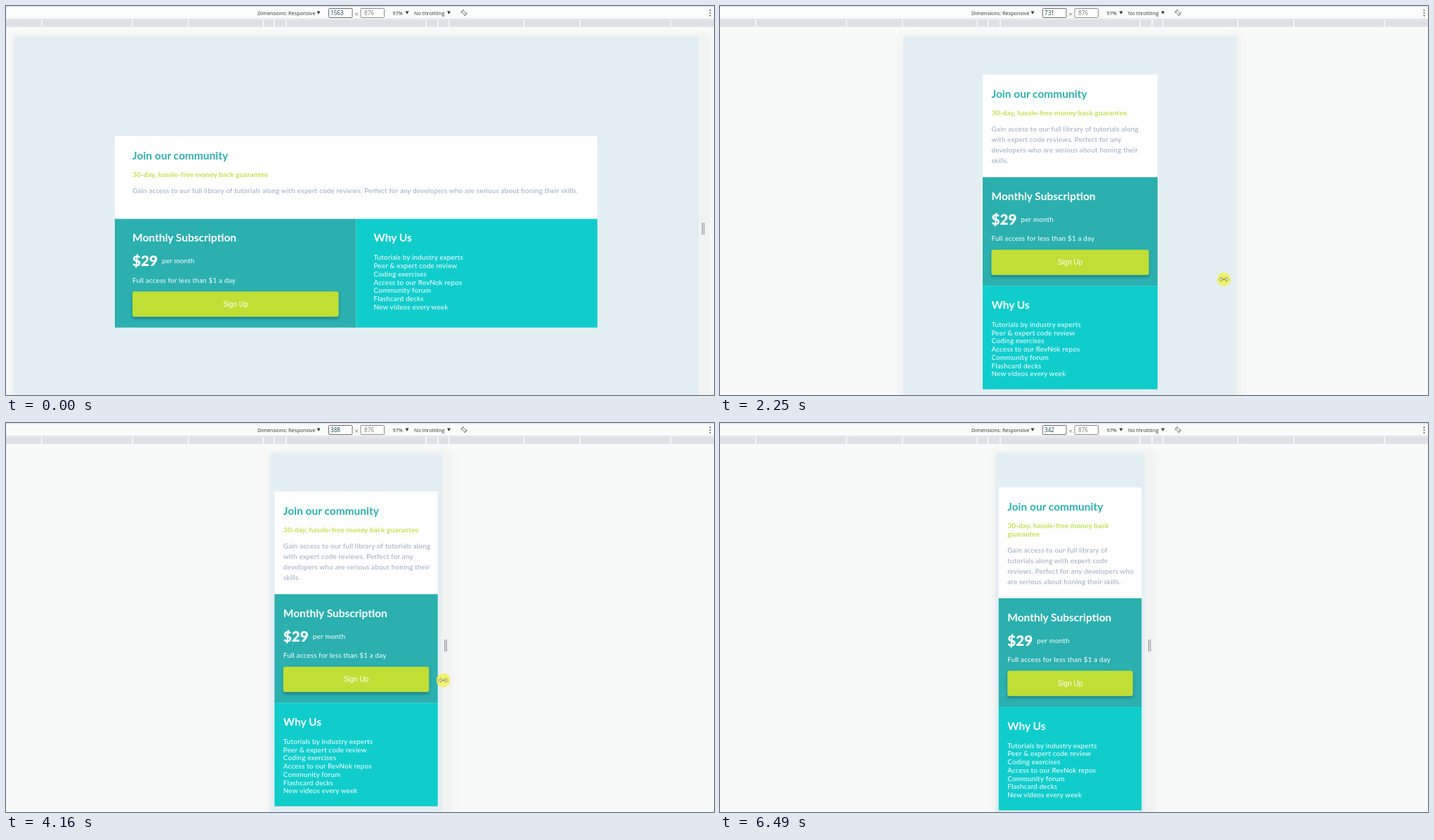
Write an HTML page that moves like this. It is 1008x555 px and loops after 7.69 s.

```html
<!DOCTYPE html>
<html lang="en">
<head>
<meta charset="utf-8">
<title>Responsive card</title>
<style>
html, body { margin: 0; width: 100%; height: 100%; overflow: hidden; background: #f8faf9; }
svg { display: block; width: 100vw; height: 100vh; }
text { white-space: pre; }
.bar { font: 7.3px "Open Sans", sans-serif; fill: #333; }
.num { font: 8.2px "Open Sans", sans-serif; }
.copy { font: 9.9px Lato, sans-serif; letter-spacing: .18px; fill: #fff; }
.head { font: bold 15.5px Lato, sans-serif; fill: #fff; }
.offer { font: bold 10.3px Lato, sans-serif; fill: #c4e052; }
.price { font: 900 20.6px Lato, sans-serif; fill: #fff; }
.label { font: 10px "Liberation Sans", Arial, sans-serif; fill: #fff; text-anchor: middle; }
</style>
</head>
<body>
<svg viewBox="0 0 1008 555" preserveAspectRatio="none">
  <defs>
    <filter id="pageShadow" x="-10%" y="-10%" width="120%" height="120%">
      <feDropShadow dx="0" dy="0" stdDeviation="6" flood-color="#55606a" flood-opacity=".12"/>
    </filter>
    <filter id="buttonShadow" x="-10%" y="-30%" width="120%" height="180%">
      <feDropShadow dx="0" dy="2.5" stdDeviation="2.2" flood-color="#124" flood-opacity=".38"/>
    </filter>
  </defs>
  <rect width="1008" height="555" fill="#f8faf9"/>

  <g id="device">
    <rect id="frame" fill="#f1f3f3" filter="url(#pageShadow)"/>
    <path id="grip" d="M-6.6 309V326M-4.2 309V326" stroke="#8b8f96" stroke-width="1.1"/>
    <rect id="page" fill="#e3eef3"/>
  </g>

  <g id="card">
    <rect id="introBox" fill="#fff"/>
    <rect id="planBox" fill="#2bb0af"/>
    <rect id="whyBox" fill="#10cdcc"/>
    <g id="intro">
      <text class="head" y="33" style="fill:#2bb1b0">Join our community</text>
      <text class="offer" id="offer"></text>
      <text class="copy" id="pitch" style="fill:#9aa8c0"></text>
    </g>
    <g id="plan">
      <text class="head" y="32.7">Monthly Subscription</text>
      <text class="price" y="67.6">$29</text>
      <text class="copy" x="42" y="63.6">per month</text>
      <text class="copy" y="91">Full access for less than $1 a day</text>
      <rect id="button" y="103.4" height="36" rx="3" fill="#bfdf34" filter="url(#buttonShadow)"/>
      <text class="label" id="buttonLabel" y="125">Sign Up</text>
    </g>
    <g id="why">
      <text class="head" y="32.7">Why Us</text>
      <text class="copy" id="perks"></text>
    </g>
  </g>

  <g id="toolbar">
    <rect width="1008" height="30" fill="#fafbfb"/>
    <rect width="1008" height="1.5" fill="#e1e2e4"/>
    <rect y="18" width="1008" height="1" fill="#dddfe2"/>
    <rect y="19.5" width="1008" height="10.3" fill="#dee0e5"/>
    <path id="ticks" stroke="#fff" stroke-width="1.4"/>
    <text class="bar" x="358" y="12.8">Dimensions: Responsive</text>
    <text class="bar" x="550.5" y="12.8">97%</text>
    <text class="bar" x="581" y="12.8">No throttling</text>
    <path d="M442.5 7.5h5l-2.5 4.2zM568.5 7.5h5l-2.5 4.2zM628 7.5h5l-2.5 4.2z" fill="#333"/>
    <rect x="459.5" y="3.5" width="33.5" height="13" rx="1" fill="#fff" stroke="#6c6c6c"/>
    <rect x="505" y="3.5" width="33.5" height="13" rx="1" fill="#fff" stroke="#8a8a8a"/>
    <text class="num" id="widthField" x="462" y="13" fill="#14484c"></text>
    <text class="num" x="510" y="13" fill="#777">876</text>
    <path d="M497 9.5l4 4m0-4l-4 4" stroke="#666" stroke-width=".8"/>
    <g fill="none" stroke="#666" stroke-width=".8">
      <rect x="650.3" y="6.6" width="3.4" height="6" rx=".6" transform="rotate(-45 652 9.6)"/>
      <path d="M648.1 10.4A4 4 0 0 1 652 5.6M655.9 8.8A4 4 0 0 1 652 13.6"/>
    </g>
    <g fill="#555"><circle cx="1002.5" cy="6.3" r="1"/><circle cx="1002.5" cy="10" r="1"/><circle cx="1002.5" cy="13.7" r="1"/></g>
  </g>

  <g id="cursor">
    <circle r="10" fill="#f0f04e" opacity=".8"/>
    <path id="resize" d="M-7.2 0L-3.2 -3V-.7H3.2V-3L7.2 0L3.2 3V.7H-3.2V3Z" fill="#f8f8b8" stroke="#75754a" stroke-width=".7"/>
    <path id="pointer" d="M0 0V9.5L2.3 7.4L3.8 10.8L5.3 10.1L3.8 6.9H6.8Z" fill="#fff" stroke="#222" stroke-width=".7"/>
  </g>
</svg>
<script>
const LOOP = 7690, CENTER = 498.5, MIDDLE = 322.25;
const FULL = 1563, HALF_SCALE = .312;
const LAG = 45, LEAD = 90; // page follows the grip, the grip follows the cursor
const ENTER = 70, GRAB = 650, RELEASE = 5740, EXIT = 6490;
const LINE = 14.85, TIGHT = 11.75;

const $ = id => document.getElementById(id);
const set = (id, attrs) => {
  for (const name in attrs) $(id).setAttribute(name, attrs[name]);
};
const box = (id, x, y, width, height) => set(id, { x, y, width, height });
const move = (id, x, y) => set(id, { transform: `translate(${x} ${y})` });
const mix = (a, b, u) => a + (b - a) * u;
const progress = (from, to, t) => Math.min(1, Math.max(0, (t - from) / (to - from)));
const ease = u => (1 - Math.cos(Math.PI * u)) / 2;

// Turning points of the drag: time, viewport width
const drag = [
  [740, FULL], [1120, 1392], [1530, 1255], [1720, 1043], [1790, 1043],
  [2310, 691], [2860, 602], [3560, 425], [4690, 355], [5150, 342]
];
const widthAt = t => drag.reduce((width, [time, next], i) =>
  i ? mix(width, next, progress(drag[i - 1][0], time, t)) : next, FULL);
const inset = width => (FULL - width) * HALF_SCALE;
const rightAt = t => 998 - inset(widthAt(t));

function cursorAt(t) {
  const grabbed = [rightAt(t + LEAD) - 7, mix(386, 363, ease(progress(2860, 3560, t)))];
  if (t < RELEASE) {
    const u = ease(progress(ENTER, GRAB, t));
    return [mix(976, grabbed[0], u), mix(533, grabbed[1] + 4, u)];
  }
  const u = ease(progress(RELEASE, EXIT, t)), v = 1 - u;
  return [mix(grabbed[0], 898, u), v * v * grabbed[1] + 2 * u * v * 260 + u * u * 546];
}

const offer = "30-day, hassle-free money back guarantee";
const pitch = "Gain access to our full library of tutorials along with expert code reviews. " +
  "Perfect for any developers who are serious about honing their skills.";
const perks = ["Tutorials by industry experts", "Peer & expert code review", "Coding exercises",
  "Access to our RevNok repos", "Community forum", "Flashcard decks", "New videos every week"];

const ruler = document.createElement("canvas").getContext("2d");
function measure(id, text) {
  const style = getComputedStyle($(id)), size = parseFloat(style.fontSize);
  ruler.font = `${style.fontWeight} 100px ${style.fontFamily}`;
  return ruler.measureText(text).width * size / 100 +
    (parseFloat(style.letterSpacing) || 0) * text.length;
}

function wrap(id, text, limit) {
  const lines = [];
  for (const word of text.split(" ")) {
    const last = lines.length - 1, longer = `${lines[last]} ${word}`;
    if (last >= 0 && measure(id, longer) <= limit) lines[last] = longer;
    else lines.push(word);
  }
  return lines;
}

function setLines(id, lines, y, step) {
  $(id).replaceChildren(...lines.map((line, i) => {
    const span = document.createElementNS("http://www.w3.org/2000/svg", "tspan");
    span.setAttribute("x", 0);
    span.setAttribute("y", y + i * step);
    span.textContent = line;
    return span;
  }));
}

function layoutCard(pageWidth, wide) {
  const cardWidth = wide ? Math.min(687, pageWidth * .779) : Math.min(249, pageWidth * .955);
  const pad = wide ? 25 : 12.5, limit = cardWidth - 2 * pad + 3.6;
  const left = CENTER - cardWidth / 2;

  const offerLines = wrap("offer", offer, limit), pitchLines = wrap("pitch", pitch, limit);
  const shift = (offerLines.length - 1) * TIGHT;
  setLines("offer", offerLines, 58, TIGHT);
  setLines("pitch", pitchLines, 81.5 + shift, LINE);

  const introHeight = wide ? 118 : 102 + shift + (pitchLines.length - 1) * LINE;
  const planHeight = 155, whyHeight = wide ? planHeight : 147.6;
  const total = introHeight + planHeight + (wide ? 0 : whyHeight);
  const top = MIDDLE - total / 2, planTop = top + introHeight;
  const column = wide ? cardWidth / 2 : cardWidth;
  const whyLeft = wide ? left + column : left;
  const whyTop = wide ? planTop : planTop + planHeight;
  const buttonWidth = column - 2 * pad;

  box("introBox", left, top, cardWidth, introHeight);
  box("planBox", left, planTop, column, planHeight);
  box("whyBox", whyLeft, whyTop, column, whyHeight);
  move("intro", left + pad, top);
  move("plan", left + pad, planTop);
  move("why", whyLeft + pad, whyTop);
  set("button", { width: buttonWidth });
  set("buttonLabel", { x: buttonWidth / 2 });
}

function draw(t) {
  const width = widthAt(t), delayed = widthAt(t - LAG);
  const left = 11 + inset(delayed), right = rightAt(t);
  const pageWidth = 2 * (CENTER - left);
  box("page", left, 43, pageWidth, 520);
  box("frame", left, 43, right - left, 540);
  move("grip", right, 0);
  layoutCard(pageWidth, delayed > 768);
  $("widthField").textContent = Math.round(width);

  const holding = t >= GRAB && t < RELEASE;
  move("cursor", ...cursorAt(t));
  set("cursor", { visibility: t >= ENTER && t < EXIT ? "visible" : "hidden" });
  set("resize", { display: holding ? "inline" : "none" });
  set("pointer", { display: holding ? "none" : "inline" });
}

const presets = [320, 375, 425, 768, 1024, 1440];
set("ticks", {
  d: presets.flatMap(size => [-size, size])
    .map(size => `M${CENTER + size * .311} 19.5V29.8`).join("")
});
setLines("perks", perks, 58.6, TIGHT);

const begin = performance.now();
function tick() {
  draw((performance.now() - begin) % LOOP);
  requestAnimationFrame(tick);
}
tick();
</script>
</body>
</html>
```
